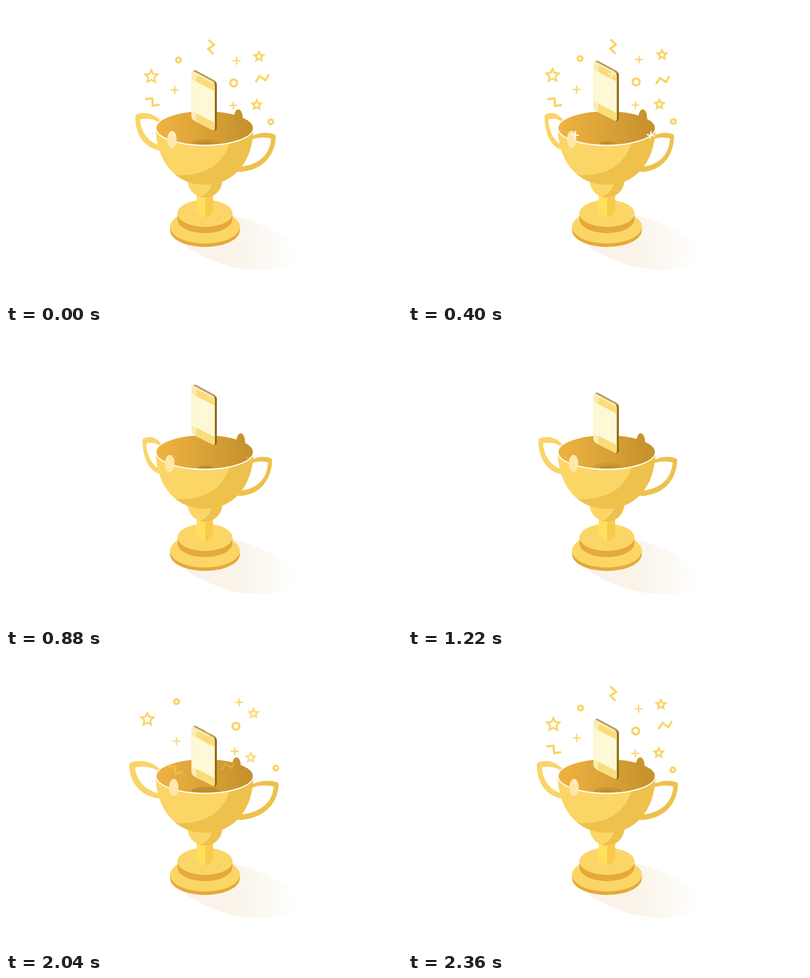
An HTML page that plays this animation: 800 px wide and 600 px high, repeating every 2.38 s.

```html
<!DOCTYPE html>
<html lang="en">
<head>
<meta charset="utf-8">
<title>Trophy</title>
<style>
  html, body { margin: 0; width: 100%; height: 100%; overflow: hidden; background: #fff; }
  svg { display: block; width: 100%; height: 100%; }
</style>
</head>
<body>
<svg viewBox="0 0 800 600">
  <defs>
    <linearGradient id="ground">
      <stop offset="0" stop-color="#fbf1ec"/>
      <stop offset=".45" stop-color="#faf4e9"/>
      <stop offset="1" stop-color="#fff"/>
    </linearGradient>
    <linearGradient id="inside">
      <stop offset="0" stop-color="#f0b342"/>
      <stop offset="1" stop-color="#c4902c"/>
    </linearGradient>
    <clipPath id="bowl"><path d="M302 248C304 320 345 363 401 363S498 320 499.500 248Z"/></clipPath>
    <clipPath id="rim"><ellipse cx="401" cy="248" rx="97" ry="33.500"/></clipPath>
    <clipPath id="knob"><circle cx="401.500" cy="354" r="35"/></clipPath>
  </defs>

  <path fill="url(#ground)" d="M457 424C520 438 590 475 588 507C580 540 500 540 450 527C420 518 390 505 363 487Z"/>

  <g transform="translate(.4 -.6)">
    <!-- base and stem -->
    <g fill="#e6a93a">
      <path d="M331 448v7a70.500 34 0 0 0 141 0v-7z"/>
      <ellipse fill="#fbd667" cx="401.500" cy="448" rx="70.500" ry="34"/>
      <path d="M346 420v13a55.500 28 0 0 0 111 0v-13z"/>
      <ellipse fill="#fbd667" cx="401.500" cy="421" rx="55.500" ry="27.500"/>
    </g>
    <path fill="#ffdf5b" d="M385 380h17v51l-17-11z"/>
    <path fill="#f9cb4a" d="M402 380h16v40l-16 11z"/>
    <g clip-path="url(#knob)">
      <path fill="#fbd667" d="M360 310h80v80h-80z"/>
      <path fill="#eec14c" d="M417 355Q414 380 387 389H440V340z"/>
    </g>

    <path id="left" fill="#fad468" fill-rule="evenodd" d="M320 244C300 218 275 214 253 220Q249 222 249.500 226C250 265 275 290 312 294ZM314 243C298 229 280 227 261 230.500C263 258 283 279 312 284Z"/>
    <path id="right" fill="#eec14c" fill-rule="evenodd" d="M490 268C510 257 530 255 548 261Q550.500 262 550 266C548 305 520 334 472 337L455 335ZM490 274C508 266 525 266 540 269C538 300 515 322 474 326Z"/>

    <!-- cup -->
    <g clip-path="url(#bowl)">
      <path fill="#fbd667" d="M300 240h204v130H300z"/>
      <path fill="#eec14c" d="M453 270C442 320 402 350 330 342V400H510V240z"/>
    </g>
    <ellipse cx="401" cy="248" rx="98.500" ry="35" fill="url(#inside)" stroke="#fff" stroke-width="2.300"/>
    <g clip-path="url(#rim)" fill="#bf8d2f">
      <ellipse id="shade" cx="403" cy="280" rx="29.500" ry="10"/>
      <ellipse cx="403" cy="280.500" rx="15.500" ry="5.500"/>
    </g>
  </g>
  <ellipse id="darkEgg" cy="227" rx="9" ry="17.500" fill="#c8942e"/>
  <ellipse id="lightEgg" cy="270.500" rx="9.500" ry="17.500" fill="#fde8a8"/>

  <g id="phone">
    <path fill="#8d6b20" d="M379 131.500Q382 130 385 132L421 151.500Q426 155 426 160V248Q426 253 420 253.500L400 200Z"/>
    <path fill="#b89a63" d="M378 132Q381 130 385 132L421 151.500L425 157L419 155Z"/>
    <path fill="#faecb6" d="M374.500 136Q375 131 380 133L417 153Q422 156 422 162V248Q422 254 417 252L383 235Q374.500 230 374.500 224Z"/>
    <path fill="#fbdc7a" d="M384 147Q384 140 390 142.500L422 160V248Q422 254 417 252L384 235Z"/>
    <path fill="#fdf9d6" d="M375.500 149.500L421 173V236.500L375.500 213.500Z"/>
  </g>
  <g id="confetti" fill="none" stroke="#f9d466"></g>
  <g id="sparkles" stroke="#fff" stroke-width="2.600"></g>
</svg>
<script>
const LOOP = 2380, BURST = 420, ORIGIN = [400, 285];
const $ = id => document.getElementById(id);
const clamp = v => Math.min(1, Math.max(0, v));
const backOut = u => 1 + 3 * (u - 1) ** 3 + 2 * (u - 1) ** 2;

function add(parent, tag, attrs) {
  const node = document.createElementNS('http://www.w3.org/2000/svg', tag);
  for (const key in attrs) node.setAttribute(key, attrs[key]);
  return $(parent).appendChild(node);
}

function starPath(radius) {
  const points = Array.from({ length: 10 }, (_, i) => {
    const r = i % 2 ? radius * .48 : radius, a = i * Math.PI / 5;
    return [r * Math.sin(a), -r * Math.cos(a)].map(v => v.toFixed(2));
  });
  return 'M' + points.join('L') + 'Z';
}

const star = (r, hole) => add('confetti', 'path',
  { d: starPath(r) + starPath(hole), fill: '#f9d466', stroke: 'none', 'fill-rule': 'evenodd' });
const ring = r => add('confetti', 'circle', { r, 'stroke-width': 4.5 });
const plus = parent => add(parent, 'path', { d: 'M-8 0H8M0-8V8', 'stroke-width': 2.6 });
const zigzag = points => add('confetti', 'polyline', { points, 'stroke-width': 4.3 });

// node, resting place, burst start, slow drift, final spread
const pieces = [
  [star(17.5, 9), 293.5, 143, 1872, .018, .2],
  [ring(4.8), 348.5, 109.5, 1872, .018, .2],
  [plus('confetti'), 466, 111, 1872, .015, .2],
  [ring(7), 460, 156, 1872, .018, .2],
  [plus('confetti'), 459, 201.5, 1882, .01, .2],
  [ring(4.7), 535, 234.8, 1872, .01, .2],
  [star(13.7, 5.2), 511, 102.5, 1927, .022, .2],
  [star(13.7, 5.2), 506.5, 200.5, 1930, .015, .2],
  [plus('confetti'), 341, 170.3, 1917, .01, .2],
  [zigzag('-14.500,-5.500 0,-7 1,8 15,6'), 296, 194.5, 1983, 0, .7],
  [zigzag('-5,-14 6,-3.500 -5.500,4.500 5,15'), 414, 83.5, 1983, .01, .2],
  [zigzag('-14,8 -6,-4.500 6,4 13,-8'), 516.5, 148.5, 2000, -.015, .2]
];

// node, place, start, whether it rides on the phone
const sparkles = [
  [plus('sparkles'), 337.5, 261, 2300, false],
  [plus('sparkles'), 490, 262, 2520, false],
  [plus('sparkles'), 412, 158, 2560, true]
];
sparkles[2][0].setAttribute('stroke', '#fdf3c4');

function scaleX(id, pivot, factor) {
  $(id).setAttribute('transform', `translate(${pivot * (1 - factor)} 0) scale(${factor} 1)`);
}

function draw(t) {
  const swing = Math.cos(2 * Math.PI * (t - 640) / LOOP);
  const lift = -3 - 21 * swing;
  $('phone').setAttribute('transform', `translate(0 ${lift})`);
  scaleX('left', 322, (59 - 16 * swing) / 72);
  scaleX('right', 480, (64 - 8 * swing) / 70.5);
  $('lightEgg').setAttribute('cx', 334.7 - 5 * swing);
  $('darkEgg').setAttribute('cx', 470 + 5.2 * swing);
  $('shade').setAttribute('opacity', clamp(.5 - .55 * swing));

  const s = t < 1400 ? t + LOOP : t;
  for (const [node, x, y, start, drift, spread] of pieces) {
    const u = clamp((s - start) / BURST), leave = clamp((s - LOOP - 540) / 270);
    const k = backOut(u) + drift * clamp((s - LOOP) / 440) + spread * leave ** 2;
    const px = ORIGIN[0] + (x - ORIGIN[0]) * k, py = ORIGIN[1] + (y - ORIGIN[1]) * k;
    node.setAttribute('transform', `translate(${px} ${py})`);
    node.setAttribute('opacity', clamp(u * 3) * (1 - leave));
  }
  for (const [node, x, y, start, riding] of sparkles) {
    const grow = clamp((s - start) / 130), leave = clamp((s - LOOP - 640) / 320);
    const angle = 10 + 45 * leave - 25 * (1 - grow);
    node.setAttribute('transform',
      `translate(${x} ${riding ? y + lift : y}) rotate(${angle}) scale(${.5 + .5 * grow - .2 * leave})`);
    node.setAttribute('opacity', grow * (1 - leave));
  }
}

function tick() {
  draw(performance.now() % LOOP);
  requestAnimationFrame(tick);
}
tick();
</script>
</body>
</html>
```
